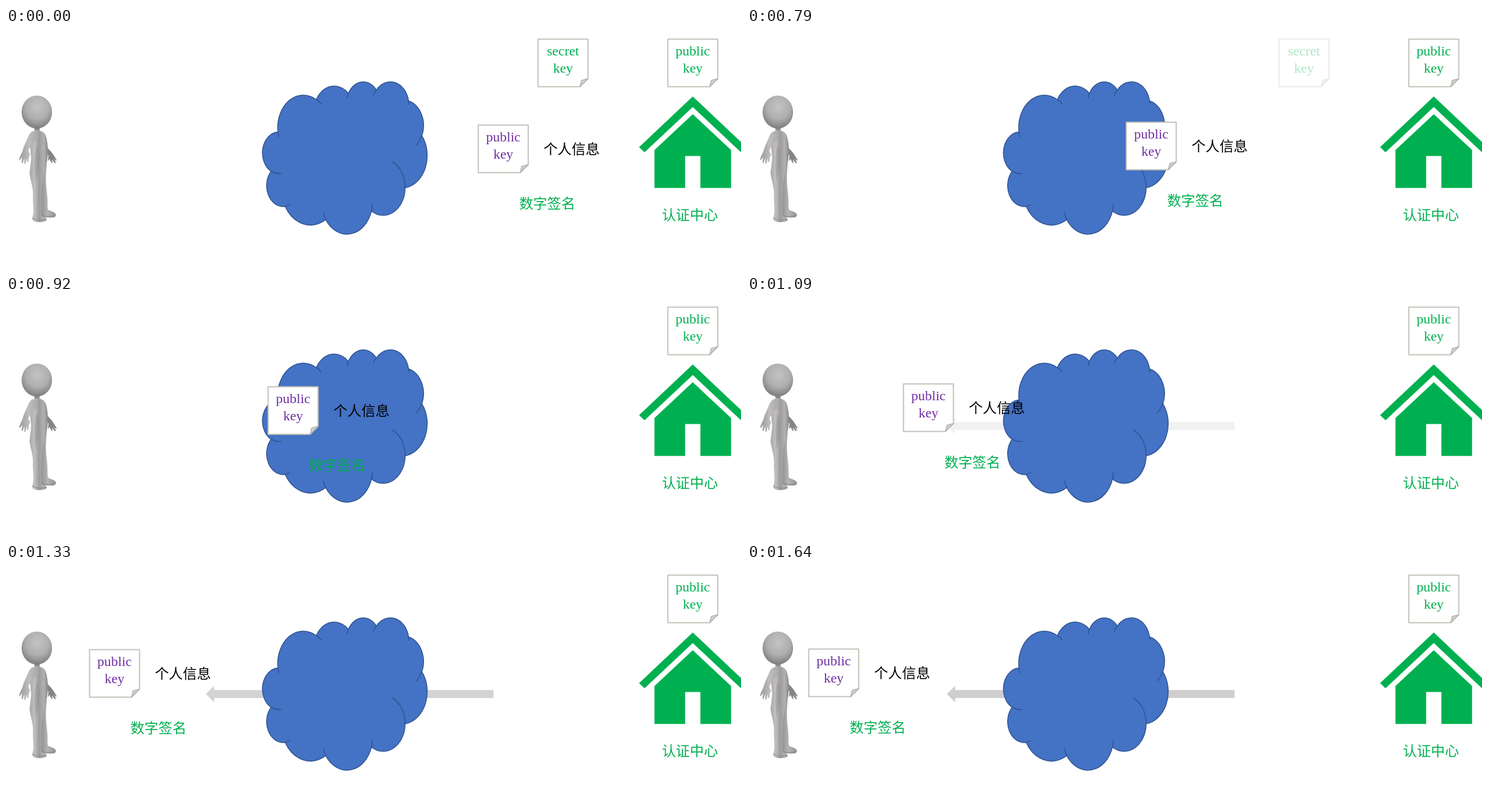
Animation, 1280 px wide and 419 px high, one loop 2.33 s. Source, as an HTML page:

```html
<!DOCTYPE html>
<html lang="zh-CN">
<head>
<meta charset="utf-8">
<title>数字签名与认证中心</title>
<style>
  html, body { margin: 0; width: 100%; height: 100%; overflow: hidden; background: #fff; }
  svg { display: block; width: 1280px; height: 419px; }
  text { text-anchor: middle; }
  .key { font: 24px "Liberation Serif", "Times New Roman", serif; }
  .kai { font: 24.4px "Noto Sans CJK SC", "Noto Sans CJK", sans-serif; }
  .green { fill: #00b050; }
  .purple { fill: #7030a0; }
</style>
</head>
<body>
<svg viewBox="0 0 1280 419">
  <defs>
    <radialGradient id="headFill" cx=".52" cy=".34" r=".68">
      <stop offset="0" stop-color="#c4c3c4"/>
      <stop offset=".55" stop-color="#b0afb0"/>
      <stop offset="1" stop-color="#7b7977"/>
    </radialGradient>
    <linearGradient id="bodyFill">
      <stop offset="0" stop-color="#a8a7aa"/>
      <stop offset=".28" stop-color="#c2c0bf"/>
      <stop offset=".52" stop-color="#9d9b9c"/>
      <stop offset=".78" stop-color="#b2b0b0"/>
      <stop offset="1" stop-color="#89888b"/>
    </linearGradient>
    <linearGradient id="legFill">
      <stop offset="0" stop-color="#88878b"/>
      <stop offset=".5" stop-color="#b6b4b4"/>
      <stop offset="1" stop-color="#919093"/>
    </linearGradient>
    <linearGradient id="armFill">
      <stop offset="0" stop-color="#98989d"/>
      <stop offset=".5" stop-color="#bfbdbc"/>
      <stop offset="1" stop-color="#a8a7a7"/>
    </linearGradient>
    <g id="sheet" stroke="#c4c0b8" stroke-width="2" stroke-linejoin="round">
      <path fill="#fff" d="M926.5 19.5H1013.5V88.5L999.5 102.5H926.5Z"/>
      <path fill="#d2d1d0" stroke="#b5b2ad" stroke-width="1.5" d="M999.5 102.5L1002.3 91.5L1013.5 88.5Z"/>
    </g>
  </defs>

  <!-- person -->
  <g>
    <path fill="#858589" d="M70 207C75 212 80 217 83 222L88 230L87 232L83 228L87 235L85 236L80 230L81 236L79 235L76 229L73 232L74 223L70 216Z"/>
    <path fill="url(#legFill)" d="M58 240L71 238C69 257 69 270 71 285C73 300 72 310 73 317C77 320 86 321 87 326Q87 331 80 331L66 331C60 330 60 324 61 316C60 300 58 272 58 240Z"/>
    <path fill="#8d8c8f" d="M49 173H59L58 182H50Z"/>
    <path fill="url(#bodyFill)" d="M50 179C57 178 66 180 69 187C73 199 74 216 72 229C70 244 65 256 63 270C62 290 61 309 62 327C65 331 71 331 71 335Q69 339 57 339C49 339 45 336 46 331C50 319 46 306 47 290C47 276 42 265 41 253C42 241 45 231 43 219C42 205 39 183 50 179Z"/>
    <path fill="#77777c" opacity=".25" d="M54 205C49 220 48 244 52 266C58 250 60 220 54 205Z"/>
    <path fill="url(#armFill)" d="M51 180C45 179 40 184 37 194C34 201 31 206 29 214L23 228L24 231L28 225L27 235L29 236L32 227L32 237L34 237L36 227L37 234L39 234L40 225L42 221L39 214C43 205 47 200 55 194Q59 183 51 180Z"/>
    <path fill="none" stroke="#77777b" stroke-width=".8" d="M46 332Q57 338 70 334M62 327Q72 331 86 328"/>
    <ellipse cx="53.7" cy="146.7" rx="26.6" ry="28.8" fill="url(#headFill)"/>
  </g>

  <path id="arrow" fill="#d0cece" opacity="0" d="M348 227L362.500 212.500V220H849V234H362.500V241.500Z"/>

  <!-- cloud: lobes, then the short creases where they overlap -->
  <g fill="none" stroke="#2f528f" stroke-width="1.5" stroke-linecap="round">
    <path fill="#4472c4" d="M473.6 181.5A44.6 56.6 0 0 1 540.4 125A35.3 44.7 0 0 1 596.3 114.1A28.9 36.6 0 0 1 645 108.3A32.1 40.6 0 0 1 701.1 127.3A35.3 44.8 0 0 1 724.3 188.2A44.8 56.8 0 0 1 695.1 279A38.2 48.4 0 0 1 636.5 319.6A44.6 56.7 0 0 1 556.7 334.7A51 64.9 0 0 1 486.1 311.4A28.8 36.4 0 0 1 461.7 250.3A28.7 36.6 0 0 1 473.6 181.5Z"/>
    <path d="M540.4 125Q546 128 549 133M596.3 114Q595 117 594 122M645 108Q642 112 640 117M701 127L702 133M724 188Q721 196 715 204M695 279C695 259 687 242 673 234M636.5 320Q638 314 638 307M557 335Q554 329 553 323M486 311Q490 311 494 308M462 250Q470 255 479 254M473.600 181Q474 186 475 190"/>
  </g>

  <!-- certificate authority -->
  <g class="green">
    <path d="M1196 119.500L1289.500 208L1280 217L1196 138L1112 217L1102.500 208Z"/>
    <path d="M1196 150.500L1262.700 213V279.200H1209.300V223.500H1182.700V279.200H1129.300V213Z"/>
    <text class="kai" x="1191" y="335">认证中心</text>
  </g>
  <g class="key green" transform="translate(226 0)">
    <use href="#sheet"/>
    <text x="970" y="48">public</text>
    <text x="970" y="78">key</text>
  </g>
  <g id="secret" class="key green">
    <use href="#sheet"/>
    <text x="970" y="48">secret</text>
    <text x="970" y="78">key</text>
  </g>

  <!-- certificate on its way to the person -->
  <g id="cert">
    <g class="key purple" transform="translate(-104 150)">
      <use href="#sheet"/>
      <text x="970" y="48">public</text>
      <text x="970" y="78">key</text>
    </g>
    <text class="kai" x="985" y="220">个人信息</text>
    <text class="kai green" x="942.5" y="315">数字签名</text>
  </g>
</svg>
<script>
const LOOP = 2330, START = 599, DURATION = 1008;
const TRAVEL = { x: -715, y: -21 };
// Moments at which the picture is refreshed; it holds in between
const TICKS = [0, 630, 720, 790, 860, 920, 1010, 1090, 1160, 1240, 1330, 1410, 1480, 1560, 1640];

const [cert, secret, arrow] = ["cert", "secret", "arrow"].map(id => document.getElementById(id));
const clamp = v => Math.min(1, Math.max(0, v));
const smooth = v => (v = clamp(v)) * v * (3 - 2 * v);

// cubic-bezier(.25, 0, .25, 1), solved by bisection
function ease(x) {
  let lo = 0, hi = 1;
  for (let i = 0; i < 24; i++) {
    const s = (lo + hi) / 2;
    if (0.75 * s * (1 - s) + s ** 3 < x) lo = s; else hi = s;
  }
  return smooth(hi);
}

function draw(time) {
  const shown = TICKS.findLast(tick => tick <= time % LOOP);
  const u = clamp((shown - START) / DURATION);
  const p = u && ease(u);
  cert.setAttribute("transform", `translate(${Math.round(TRAVEL.x * p)} ${Math.round(TRAVEL.y * p)})`);
  secret.setAttribute("opacity", 1 - smooth(u / 0.3));
  arrow.setAttribute("opacity", smooth((u - 0.3) / 0.53));
}

let origin;
function frame(now) {
  origin ??= now;
  draw(now - origin);
  requestAnimationFrame(frame);
}
draw(0);
requestAnimationFrame(frame);
</script>
</body>
</html>
```
